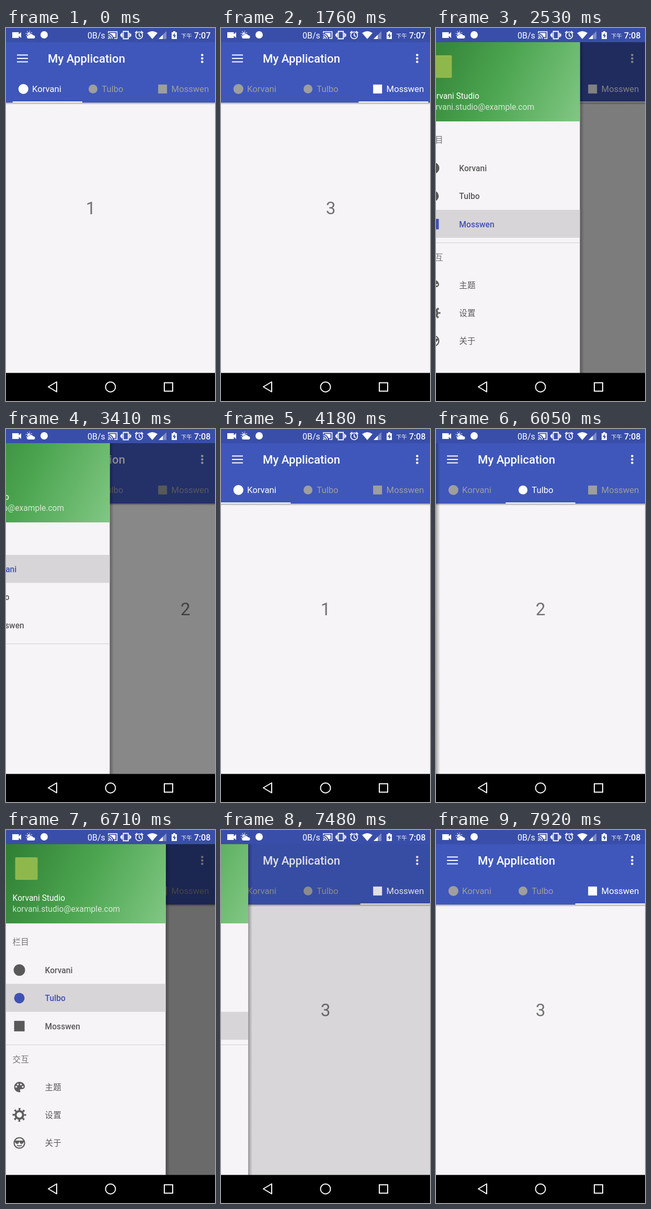
An HTML page for the animation above (8 s loop, 400 by 711 pixels).

```html
<!DOCTYPE html>
<html lang="zh">
<head>
<meta charset="utf-8">
<title>Tabs and drawer</title>
<style>
  html, body { margin: 0; width: 100%; height: 100%; overflow: hidden; background: #000; }
  svg { display: block; font-family: Roboto, "Noto Sans CJK SC", "Noto Sans CJK", sans-serif; }
  .line { fill: none; stroke: #fff; }
  .medium { font-weight: 500; }
  #tabs { font-size: 16.67px; }
  #pages { font-size: 33.3px; text-anchor: middle; fill: #737273; }
  #drawer { font-size: 15.6px; }
</style>
</head>
<body>
<svg width="400" height="711" viewBox="0 0 400 711">
  <defs>
    <linearGradient id="green" gradientUnits="userSpaceOnUse" x1="0" y1="27" x2="311" y2="178">
      <stop stop-color="#2e7d32"/><stop offset=".5" stop-color="#4ca550"/><stop offset="1" stop-color="#81c784"/>
    </linearGradient>
    <linearGradient id="below" x2="0" y2="1">
      <stop stop-opacity=".35"/><stop offset="1" stop-opacity="0"/>
    </linearGradient>
    <linearGradient id="beside">
      <stop stop-opacity=".3"/><stop offset="1" stop-opacity="0"/>
    </linearGradient>
  </defs>

  <rect width="400" height="711" fill="#f6f4f6"/>
  <g id="pages"></g>

  <!-- app bar -->
  <rect y="142" width="400" height="4" fill="url(#below)"/>
  <rect y="27" width="400" height="115" fill="#3f57ba"/>
  <path class="line" stroke-width="2.2" d="M21 51.5h21M21 58h21M21 64.5h21"/>
  <text class="medium" x="80" y="66" font-size="22.2" fill="#fff">My Application</text>
  <g fill="#fff"><circle cx="375.5" cy="51.5" r="2.3"/><circle cx="375.5" cy="58" r="2.3"/><circle cx="375.5" cy="64.5" r="2.3"/></g>
  <g id="tabs"></g>
  <rect id="indicator" y="140" width="133.3" height="2.2" fill="#fff"/>

  <rect id="scrim" y="27" width="400" height="684"/>
  <g id="drawer">
    <rect x="311" y="27" width="8" height="684" fill="url(#beside)"/>
    <rect y="27" width="311" height="684" fill="#f6f4f6"/>
    <rect y="27" width="311" height="151" fill="url(#green)"/>
    <rect x="23" y="52" width="43" height="43" rx="2" fill="#8fb84c"/>
    <text x="18" y="134.5" fill="#fff">Korvani Studio</text>
    <text x="18" y="155.5" fill="#fff" fill-opacity=".75">korvani.studio@example.com</text>
    <rect id="highlight" width="311" height="53.3" fill="#d7d5d8"/>
    <path stroke="#d0ced0" d="M0 409.5h311"/>
    <g fill="#757475"><text x="18" y="219">栏目</text><text x="18" y="442.5">交互</text></g>
    <g id="items"></g>
    <g class="medium" fill="#5a595a">
      <text x="80" y="496">主题</text><text x="80" y="549">设置</text><text x="80" y="602">关于</text>
    </g>
    <g transform="translate(31 490)">
      <path fill="#5f5e5f" d="M0-10A10 10 0 0 0 0 10C2 10 2.5 8 1.5 7C.5 5 1.5 4 3 4H5.5A5 5 0 0 0 10.5-1C10.5-6 6-10 0-10z"/>
      <g fill="#f6f4f6"><circle cx="-6" cy="-.5" r="1.7"/><circle cx="-3" cy="-5" r="1.7"/><circle cx="3" cy="-5" r="1.7"/><circle cx="6.5" cy="-.5" r="1.7"/></g>
    </g>
    <g transform="translate(31 543)" fill="none" stroke="#5f5e5f">
      <circle r="7.2" stroke-width="4"/>
      <circle r="10.8" stroke-width="4.6" stroke-dasharray="3.4 5.082" stroke-dashoffset="1.7"/>
    </g>
    <g transform="translate(31 596.5)" fill="none" stroke="#5f5e5f" stroke-width="2.2">
      <circle r="10"/>
      <path d="M-4.5 4Q0 7.5 4.5 4" stroke-width="1.8"/>
      <path fill="#5f5e5f" stroke="none" d="M-8.5-4.5H8.5V-2Q7 2 3.5 2Q1 1.5.5-2H-.5Q-1 1.5-3.5 2Q-7 2-8.5-2z"/>
    </g>
  </g>

  <!-- status bar -->
  <rect width="400" height="27" fill="#394ea9"/>
  <g fill="#fff">
    <path d="M12 8h12.500v4l4.500-4v11l-4.500-4v4H12z"/>
    <circle cx="44" cy="11.500" r="3.300"/>
    <circle class="line" cx="44" cy="11.500" r="5.500" stroke-width="1.600" stroke-dasharray="1.400 2.920"/>
    <path stroke="#394ea9" d="M43 20.500a3.500 3.500 0 0 1 0-7a5 5 0 0 1 9 0a3.500 3.500 0 0 1 1 7z"/>
    <circle cx="73" cy="13" r="7"/>
    <text x="156" y="19.500" font-size="16">0B/s</text>
    <path d="M198.500 9.500h11v8h-3.500a12 12 0 0 0-7.500-7z"/>
    <path class="line" stroke-width="1.600" d="M196 10V7h16.500v13H207M195.500 12.500a8 8 0 0 1 8 8M195.500 16a4.500 4.500 0 0 1 4.500 4.500"/>
    <circle cx="196.500" cy="19.500" r="1.300"/>
    <path class="line" stroke-width="1.800" d="M224.500 6.500h9.500v14h-9.500zM220 11v5M222 9v9M236.500 9v9M238.600 11v5"/>
    <path class="line" stroke-width="1.700" d="M247 9.500l4-3.500M262.500 9.500l-4-3.500M254.800 10v4.500l3 2"/>
    <circle class="line" cx="254.800" cy="14" r="6.500" stroke-width="1.700"/>
    <path d="M270 9.500Q280 2.500 290 9.500L280 21z"/>
    <path fill-opacity=".35" d="M292 21L307 6V21z"/><path d="M292 21l8-8v8z"/>
    <path d="M317 8h3V6h4v2h3v13h-10z"/>
    <path fill="#394ea9" d="M323 9.500l-4 5.500h2.500v4.500l4-5.500H323z"/>
    <text x="335" y="19" font-size="10.500">下午</text>
    <text id="clock" class="medium" x="360" y="19.500" font-size="16"></text>
  </g>

  <!-- navigation bar -->
  <rect y="657.5" width="400" height="54"/>
  <g class="line" stroke-width="2">
    <path stroke-linejoin="round" d="M81 684l16-9.500v19z"/>
    <circle cx="200" cy="684.200" r="9.500"/>
    <path d="M303 676.200h16v16h-16z"/>
  </g>
</svg>

<script>
const $ = id => document.getElementById(id);
const names = ['Korvani', 'Tulbo', 'Mosswen'];

// Plain marks: two discs and a square
const mark = (i, x, y, r) => i < 2
  ? `<circle cx="${x}" cy="${y}" r="${r - i}"/>`
  : `<rect x="${x - r + 1}" y="${y - r + 1}" width="${2 * r - 2}" height="${2 * r - 2}"/>`;

$('pages').innerHTML = names.map((_, i) => `<text x="${200 + 400 * i}" y="355">${i + 1}</text>`).join('');
$('tabs').innerHTML = names.map((name, i) =>
  `<g>${mark(i, 33.3 + 133.2 * i, 116.3, 9.5)}<text x="${50 + 133.3 * i}" y="122.3">${name}</text></g>`).join('');
$('items').innerHTML = names.map((name, i) => {
  const y = 267 + 53.4 * i;
  return `<g>${mark(i, 31, y, 11)}<text class="medium" x="80" y="${y + 5.7}">${name}</text></g>`;
}).join('');

const linear = u => u;
const quint = u => 1 - (1 - u) ** 5;

// Moves: [start, duration, from, to, easing]
const swipes = [
  [0, 220, .095, .553, linear], [220, 970, .553, 1, quint],
  [1196, 234, 1, 1.6, linear], [1430, 775, 1.6, 2, quint]
];
// Clicks on drawer items: [start, from, to]; the indicator arrives before the page
const clicks = [[3349, 2, 0], [5549, 0, 1], [7309, 1, 2]];
const pageMoves = swipes.concat(clicks.map(([start, a, b]) => [start, 100 + 100 * Math.abs(a - b), a, b, quint]));
const tabMoves = swipes.concat(clicks.map(([start, a, b]) => [start, 100, a, b, quint]));
const drawerMoves = [0, 2350, 3366, 4446, 5566, 6426, 7326]
  .map((start, i) => i ? [start, 512, 1 - i % 2, i % 2, quint] : [0, 1, 0, 0, linear]);
const selections = [[0, 0], [220, 1], [1430, 2], ...clicks.map(([start, , to]) => [start, to])];

const latest = (list, t) => list.filter(entry => entry[0] <= t).pop();
const value = (moves, t) => {
  const [start, duration, from, to, ease] = latest(moves, t);
  return from + (to - from) * ease(Math.min(1, (t - start) / duration));
};
const paint = (group, selected, on, off) =>
  [...group.children].forEach((el, i) => el.setAttribute('fill', i === selected ? on : off));

function draw(t) {
  const open = value(drawerMoves, t);
  const shade = value(drawerMoves, Math.max(0, t - 17)); // one refresh late
  const selected = latest(selections, t)[1];
  $('pages').setAttribute('transform', `translate(${-400 * value(pageMoves, t)})`);
  $('indicator').setAttribute('x', 133.33 * value(tabMoves, t));
  $('scrim').setAttribute('fill-opacity', .58 * shade);
  $('drawer').setAttribute('transform', `translate(${311 * (open - 1)})`);
  $('drawer').setAttribute('visibility', open ? 'visible' : 'hidden');
  $('highlight').setAttribute('y', 240 + 53.3 * selected);
  paint($('tabs'), selected, '#fff', '#9e9e9e');
  paint($('items'), selected, '#3f51b5', '#5a595a');
  $('clock').textContent = t < 1870 ? '7:07' : '7:08';
}

// The screen refreshes in steps of 110 ms
const STEP = 110, LOOP = 8000;
function tick() {
  const t = (performance.now() + 10) % LOOP;
  draw(Math.floor(t / STEP) * STEP);
  requestAnimationFrame(tick);
}
tick();
</script>
</body>
</html>
```
